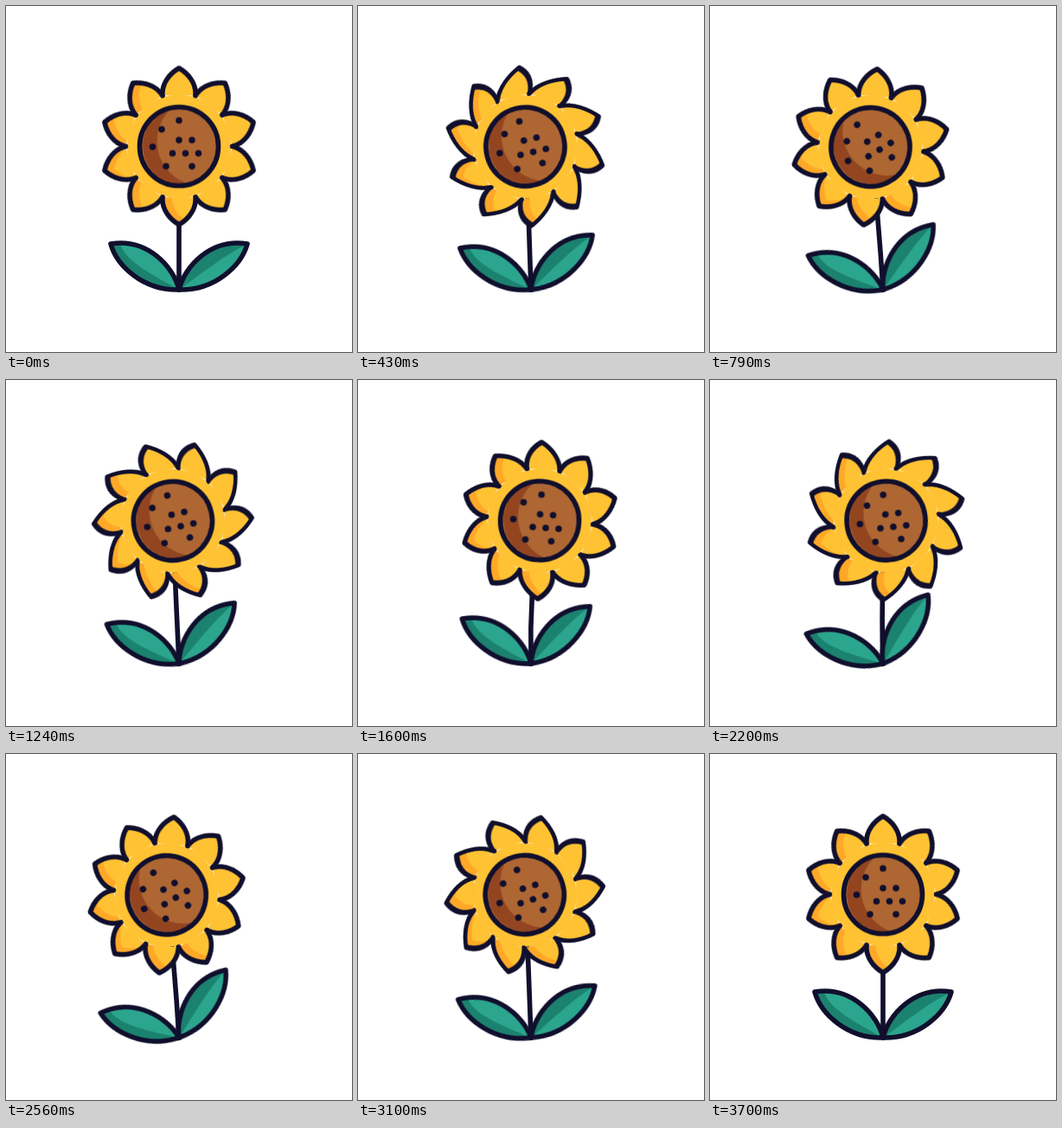
An HTML page without scripts that plays this animation: 400 px wide and 400 px high, repeating every 3.76 s.

```html
<!DOCTYPE html>
<html lang="en">
<head>
<meta charset="utf-8">
<title>Swaying sunflower</title>
<style>
  html, body { margin: 0; width: 100%; height: 100%; overflow: hidden; background: #fff; }
  svg { display: block; width: 100vw; height: 100vh; }

  .line { fill: none; stroke: #100f2d; stroke-width: 5.6; stroke-linecap: round; stroke-linejoin: round; }
  .petal-line { vector-effect: non-scaling-stroke; }
  .seeds { stroke-width: 7.6; }
  .yellow { fill: #ffc233; }
  .orange { fill: #ffa828; }
  .brown { fill: #ae6633; }
  .dark-brown { fill: #934520; }
  .green { fill: #2ba58d; }
  .dark-green { fill: #1b826f; }

  .petal { transform: rotate(var(--a)); }
  /* The lit part is offset in the head's axes, whatever way the petal points. */
  .light { transform: rotate(calc(-1 * var(--a))) translate(11px, -2px) rotate(var(--a)); }

  .stem, .sway, .spin, .lean, .leaf {
    animation: 3760ms cubic-bezier(.37, 0, .63, 1) infinite;
  }
  .stem { animation-name: bend; }
  .sway { animation-name: sway; }
  .spin { animation-name: spin; }
  .lean { animation-name: lean; transform-origin: 0 -59px; }
  .leaf { transform-origin: 200px 328px; }
  .left { animation-name: left-leaf; }
  .right { animation-name: right-leaf; }

  @keyframes sway {
    0%, 3.46% { transform: translate(200px, 162.3px); }
    20.48% { transform: translate(185.5px, 163px); animation-timing-function: cubic-bezier(.58, 0, .8, 1); }
    48.94% { transform: translate(219px, 162.3px); }
    69.15% { transform: translate(185.5px, 163px); }
    95.74%, 100% { transform: translate(200px, 162.3px); }
  }
  @keyframes bend {
    0%, 3.46% { d: path("M200 328Q200 245 200 162"); }
    20.48% { d: path("M200 328Q195 245 185.5 162"); animation-timing-function: cubic-bezier(.58, 0, .8, 1); }
    48.94% { d: path("M200 328Q199 245 219 162"); }
    69.15% { d: path("M200 328Q195 245 185.5 162"); }
    95.74%, 100% { d: path("M200 328Q200 245 200 162"); }
  }
  @keyframes spin {
    0%, 3.46% { transform: rotate(0deg); }
    21.01% { transform: rotate(-31deg); animation-timing-function: cubic-bezier(.4, 0, .4, 1); }
    49.47% { transform: rotate(6.5deg); animation-timing-function: cubic-bezier(.55, 0, .565, 1); }
    69.15% { transform: rotate(-31deg); }
    98.14%, 100% { transform: rotate(0deg); }
  }
  /* Petal tips trail behind the turning disc. */
  @keyframes lean {
    0%, 3.46% { transform: skewX(0deg); }
    11.5% { transform: skewX(-23deg); }
    21.01% { transform: skewX(0deg); }
    33.24% { transform: skewX(20deg); }
    42.55% { transform: skewX(7deg); }
    49% { transform: skewX(0deg); }
    58.51% { transform: skewX(-22deg); }
    69.15% { transform: skewX(0deg); }
    82.45% { transform: skewX(17.5deg); }
    98.14%, 100% { transform: skewX(0deg); }
  }
  @keyframes left-leaf {
    0%, 3.46% { transform: rotate(0deg); }
    22.6% { transform: rotate(-9.5deg); }
    43.88% { transform: rotate(-.7deg); }
    65.96% { transform: rotate(-16.6deg); }
    94.4%, 100% { transform: rotate(0deg); }
  }
  @keyframes right-leaf {
    0%, 3.46% { transform: rotate(0deg); }
    21.28% { transform: rotate(-18.5deg); }
    42.55% { transform: rotate(-10.3deg); }
    61.97% { transform: rotate(-24deg); }
    91.76%, 100% { transform: rotate(0deg); }
  }
</style>
</head>
<body>
<svg viewBox="0 0 400 400">
  <defs>
    <path id="petal-shape" d="M-19.1-59C-20-73-11-84 0-90.5C11-84 20-73 19.1-59"/>
    <clipPath id="petal-clip"><use href="#petal-shape"/></clipPath>
    <g id="petal">
      <use href="#petal-shape" class="yellow"/>
      <use href="#petal-shape" class="line petal-line"/>
    </g>
    <g id="shaded">
      <use href="#petal-shape" class="orange"/>
      <g clip-path="url(#petal-clip)"><use href="#petal-shape" class="yellow light"/></g>
      <use href="#petal-shape" class="line petal-line"/>
    </g>
    <path id="leaf-shape" d="M200 328C194 302 164 268 121 275C128 300 158 329 200 328Z"/>
  </defs>

  <path class="line stem" d="M200 328Q200 245 200 162"/>

  <g class="leaf left">
    <use href="#leaf-shape" class="green"/>
    <path class="dark-green" d="M121 275C128 300 158 329 200 328C172 312 138 296 132 275"/>
    <use href="#leaf-shape" class="line"/>
  </g>
  <g class="leaf right">
    <g transform="matrix(-1 0 0 1 400 0)">
      <use href="#leaf-shape" class="green"/>
      <path class="dark-green" d="M200 328C194 302 164 268 121 275C148 288 172 308 200 328"/>
      <use href="#leaf-shape" class="line"/>
    </g>
  </g>

  <g class="sway">
    <g class="spin">
      <circle class="yellow" r="60"/>
      <g class="petal" style="--a: 0deg"><use href="#petal" class="lean"/></g>
      <g class="petal" style="--a: 36deg"><use href="#petal" class="lean"/></g>
      <g class="petal" style="--a: 72deg"><use href="#petal" class="lean"/></g>
      <g class="petal" style="--a: 108deg"><use href="#petal" class="lean"/></g>
      <g class="petal" style="--a: 144deg"><use href="#petal" class="lean"/></g>
      <g class="petal" style="--a: 180deg"><use href="#shaded" class="lean"/></g>
      <g class="petal" style="--a: 216deg"><use href="#shaded" class="lean"/></g>
      <g class="petal" style="--a: 252deg"><use href="#shaded" class="lean"/></g>
      <g class="petal" style="--a: 288deg"><use href="#shaded" class="lean"/></g>
      <g class="petal" style="--a: 324deg"><use href="#shaded" class="lean"/></g>

      <circle class="brown" r="45.5"/>
      <path class="dark-brown" d="M-8-44.8A45.5 45.5 0 0 0 12 43.9A52 52 0 0 1-8-44.8"/>
      <circle class="line" r="45.5"/>
      <path class="line seeds" d="M0-30h0M-20-19.7h0M-30.5 .5h0M0-7.3h0M15-7.3h0M-7.5 8h0M7.5 8h0M22.5 8h0M-15 23h0M15 23h0"/>
    </g>
  </g>
</svg>
</body>
</html>
```
